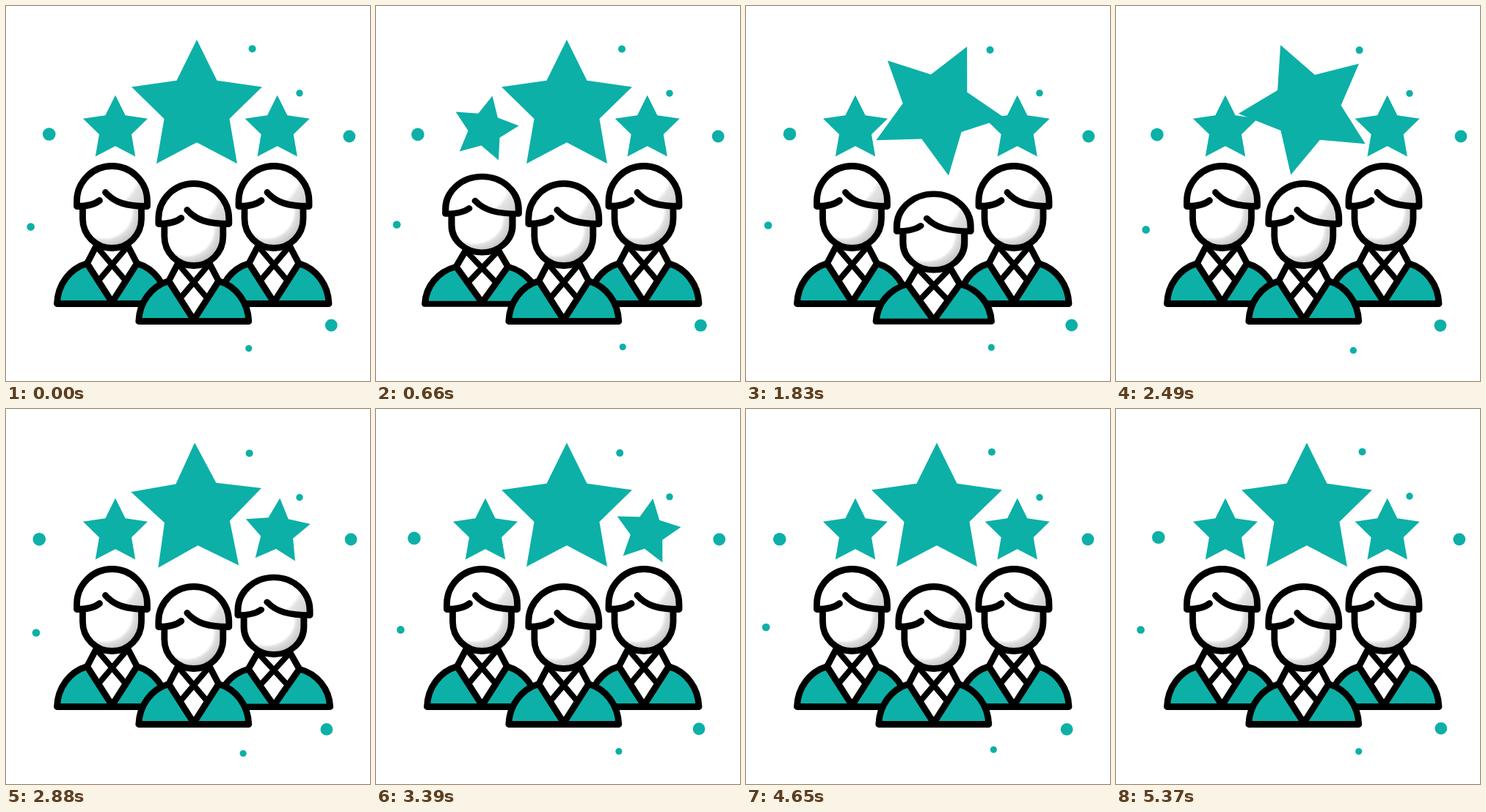
Animation, 496 px wide and 512 px high, one loop 5.4 s. Source, as an HTML page:

```html
<!DOCTYPE html>
<html lang="en">
<head>
<meta charset="utf-8">
<title>Star team</title>
<style>
  html, body { margin: 0; width: 100%; height: 100%; overflow: hidden; background: #fff; }
  svg { display: block; width: 496px; height: 512px; }
</style>
</head>
<body>
<svg id="stage" viewBox="0 0 496 512" fill="#0cb0a7">
  <defs>
    <radialGradient id="faceShade" gradientUnits="userSpaceOnUse" cx="-10" cy="-131" r="50">
      <stop offset=".73" stop-color="#fff"/>
      <stop offset=".81" stop-color="#e0e0e0"/>
      <stop offset="1" stop-color="#c6c6c6"/>
    </radialGradient>
    <radialGradient id="hairShade" gradientUnits="userSpaceOnUse" cx="-20" cy="-190" r="80">
      <stop offset=".7" stop-color="#fff"/>
      <stop offset=".77" stop-color="#e4e4e4"/>
      <stop offset="1" stop-color="#d0d0d0"/>
    </radialGradient>
    <!-- Origin: middle of the base line -->
    <g id="person" stroke="#000" stroke-width="8.8" stroke-linecap="round" stroke-linejoin="round">
      <path d="M-75 -4C-74 -30 -58 -52 -34 -59H34C58 -52 74 -30 75 -4Z"/>
      <path fill="#fff" d="M-22 -82L-34 -59L0 -6L34 -59L22 -82Z"/>
      <path fill="none" stroke-width="8" d="M-21 -82L18 -36M21 -82L-18 -36"/>
      <path fill="url(#faceShade)" stroke="none" d="M-40 -160V-120A40 40 0 0 0 40 -120V-160Z"/>
      <path fill="none" d="M-40 -136V-120A40 40 0 0 0 40 -120V-136"/>
      <path fill="url(#hairShade)" d="M-17 -145C-23 -140 -33 -137 -48 -137V-144A48 48 0 0 1 48 -144V-137C20 -137 3 -142 -9 -156"/>
    </g>
  </defs>
</svg>
<script>
const LOOP = 5400, STEP = 30, SPIN = 1322, SQUASH = 580;
const stage = document.getElementById('stage');

function add(tag, attrs) {
  const node = document.createElementNS('http://www.w3.org/2000/svg', tag);
  for (const key in attrs) node.setAttribute(key, attrs[key]);
  return stage.appendChild(node);
}

function starPoints(radius) {
  return Array.from({ length: 10 }, (_, i) => {
    const angle = i * Math.PI / 5, r = i % 2 ? radius / 2 : radius;
    return (r * Math.sin(angle)).toFixed(2) + ',' + (-r * Math.cos(angle)).toFixed(2);
  }).join(' ');
}

// Each person squashes while the star above spins once
const pairs = [
  { start: 512, star: { x: 149, y: 168, r: 46.3, lift: 2 }, person: { x: 144.5, y: 410.5 } },
  { start: 2794, star: { x: 369.7, y: 168, r: 46.3, lift: 0 }, person: { x: 365, y: 410.5 } },
  { start: 1612, star: { x: 260, y: 139.5, r: 93.5, lift: 0 }, person: { x: 255.8, y: 434.5 } }
];
for (const { star } of pairs) star.node = add('polygon', { points: starPoints(star.r) });
for (const { person } of pairs) person.node = add('use', { href: '#person' });

// Dots sway around home along (dx, dy)
const dots = [
  { x: 54, y: 176, r: 8.8, dx: 9.5, dy: -2, sway: quick },
  { x: 441, y: 436.5, r: 8.4, dx: 4.5, dy: -1, sway: quick },
  { x: 400, y: 119.6, r: 4.7, dx: 0, dy: -1.3, sway: quick },
  { x: 467, y: 178, r: 8.4, dx: 2, dy: 0, sway: uneven },
  { x: 31, y: 300, r: 5.3, dx: 6.7, dy: 3.7, sway: uneven },
  { x: 333.5, y: 466.5, r: 4.6, dx: -6.9, dy: 2.5, sway: uneven },
  { x: 333.6, y: 59.4, r: 5, dx: 2, dy: -1, sway: Math.cos }
];
for (const dot of dots) dot.node = add('circle', { r: dot.r });

function quick(phase) { return Math.cos(3 * phase - Math.PI / 3); }
function uneven(phase) { return Math.cos(2 * phase) - 0.6 * Math.cos(phase); }

const clamp = v => Math.min(1, Math.max(0, v));
const ease = u => u * u * (3 - 2 * u);
const pulse = u => Math.sin(Math.PI * clamp(u)) ** 2;

function draw(t) {
  for (const { start, star, person } of pairs) {
    const since = t - start;
    const angle = 360 * ease(clamp(since / SPIN));
    star.node.setAttribute('transform',
      `translate(${star.x} ${star.y}) rotate(${angle} 0 ${-star.lift})`);
    const sx = 1 + 0.048 * pulse((since + 50) / SQUASH);
    const sy = 1 - 0.077 * pulse((since + 110) / SQUASH);
    person.node.setAttribute('transform', `translate(${person.x} ${person.y}) scale(${sx} ${sy})`);
  }
  for (const { node, x, y, dx, dy, sway } of dots) {
    const s = sway(2 * Math.PI * t / LOOP);
    node.setAttribute('cx', x + dx * s);
    node.setAttribute('cy', y + dy * s);
  }
}

const began = performance.now();
function tick() {
  const t = (performance.now() - began) % LOOP;
  draw(Math.floor(t / STEP) * STEP);
  requestAnimationFrame(tick);
}
tick();
</script>
</body>
</html>
```
